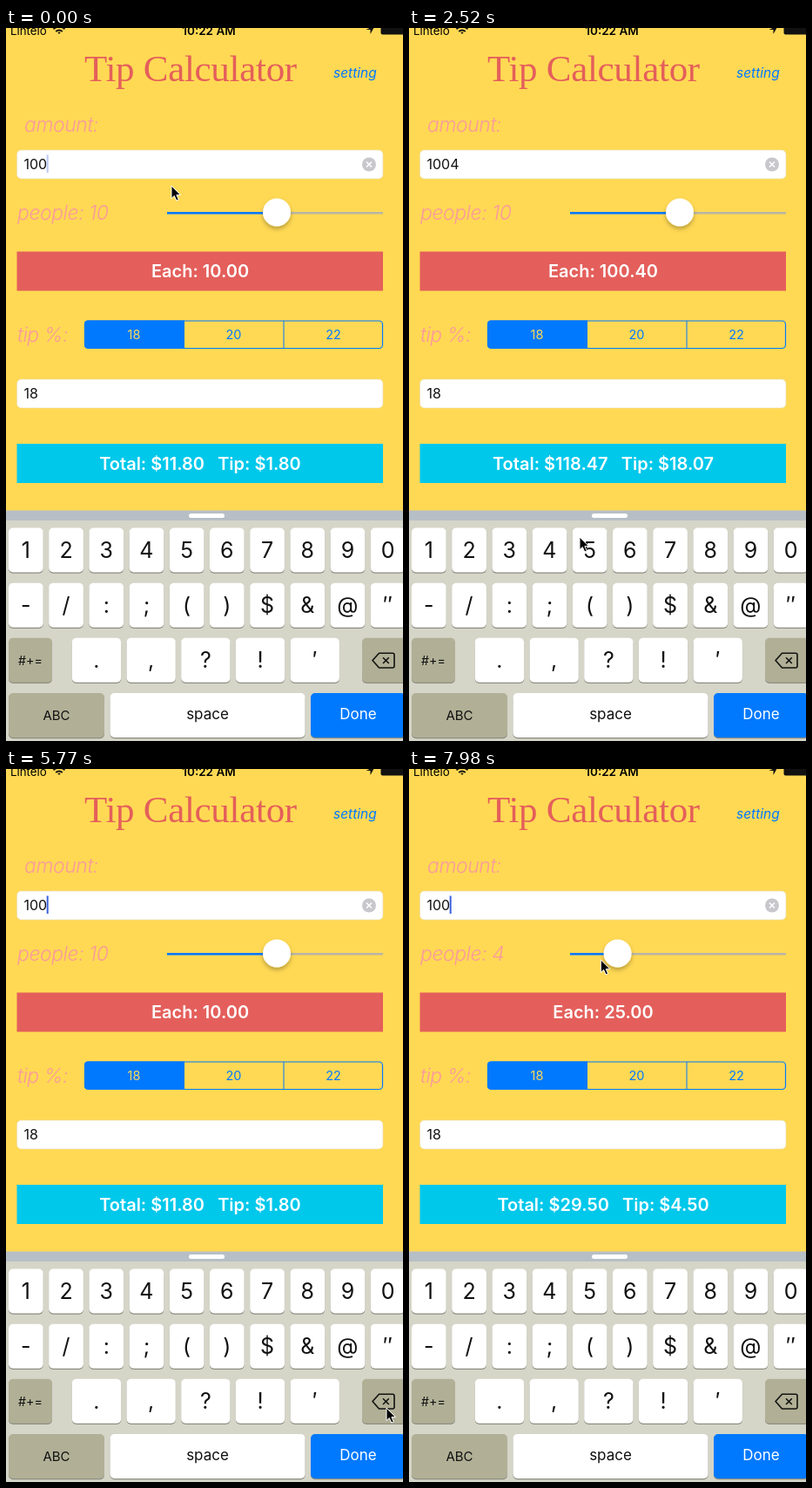
These frames come from a looping animation (456x818 px, 8 s). An HTML page:

```html
<!DOCTYPE html>
<html lang="en">
<head>
<meta charset="utf-8">
<title>Tip Calculator</title>
<style>
  html, body { margin: 0; width: 100%; height: 100%; overflow: hidden; background: #ffd954; }
  svg { display: block; width: 456px; height: 818px; font-family: Inter, Roboto, sans-serif; }
  text { white-space: pre; }
  .mid { text-anchor: middle; }
  .label { font-size: 23px; font-style: italic; font-weight: 300; letter-spacing: -.45px; fill: #fb9a9c; }
  .bar { font-size: 20px; font-weight: 600; fill: #fff; text-anchor: middle; }
  .field { font-size: 16px; fill: #111; }
  .seg { font-size: 14.5px; fill: #0079ff; text-anchor: middle; }
</style>
</head>
<body>
<svg id="stage" viewBox="0 0 456 818">
  <defs>
    <filter id="soft" x="-50%" y="-50%" width="200%" height="200%">
      <feDropShadow dx="0" dy="3" stdDeviation="2.6" flood-color="#000" flood-opacity=".28"/>
    </filter>
  </defs>
  <rect width="456" height="818" fill="#ffd954"/>

  <text x="5" y="7.5" font-size="13.3">Lintelo</text>
  <g fill="none" stroke="#111" stroke-width="1.8">
    <path d="M54.5 1.2Q61 -4 67.5 1.2M57.2 4Q61 1 64.8 4"/>
    <path d="M59.2 4.8L61 7L62.8 4.8Z" fill="#111" stroke="none"/>
  </g>
  <text class="mid" x="233" y="7.5" font-size="13.5" font-weight="600">10:22 AM</text>
  <path d="M424 -3L413.5 2H418.5V7Z" fill="#111"/>
  <rect x="430.5" y="-4" width="30" height="11.5" rx="2" fill="#111"/>

  <text x="90" y="61" font-size="43" letter-spacing="-.3" fill="#e45f5b"
    style="font-family:'Liberation Serif',serif">Tip Calculator</text>
  <text x="376" y="56.5" font-size="15.5" font-style="italic" fill="#0079ff">setting</text>

  <text class="label" x="21" y="119">amount:</text>
  <rect x="12.5" y="140" width="420.5" height="33" rx="5" fill="#fff" stroke="#e6d9a8" stroke-width=".6"/>
  <text class="field" id="amount" x="20.5" y="162"></text>
  <rect id="caret" y="145.5" width="2" height="20.5" fill="#3a62dc"/>
  <circle cx="417" cy="156.5" r="8" fill="#c7c7cc"/>
  <path d="M414 153.5l6 6m0 -6l-6 6" stroke="#fff" stroke-width="1.6"/>

  <text class="label" id="people" x="13" y="220"></text>
  <path d="M185 212.3H433" stroke="#b8b5a6" stroke-width="2.4"/>
  <path id="track" stroke="#0079ff" stroke-width="2.6"/>
  <circle id="thumb" cy="211.5" r="16" fill="#fff" filter="url(#soft)"/>

  <rect x="12.5" y="256.5" width="420.5" height="45" fill="#e45f5b"/>
  <text class="bar" id="each" x="223" y="286"></text>

  <text class="label" x="13" y="360">tip %:</text>
  <path d="M205 335.5H94a4 4 0 0 0 -4 4V363.500a4 4 0 0 0 4 4H205Z" fill="#0079ff"/>
  <rect x="90.500" y="336" width="342" height="31.500" rx="4" fill="none" stroke="#0079ff" stroke-width="1.2"/>
  <path d="M319 336V367" stroke="#0079ff"/>
  <text class="seg" x="147" y="356.5" style="fill:#ffd954">18</text>
  <text class="seg" x="261.5" y="356.5">20</text>
  <text class="seg" x="376" y="356.5">22</text>

  <rect x="12.5" y="403" width="420.5" height="33" rx="5" fill="#fff" stroke="#e6d9a8" stroke-width=".6"/>
  <text class="field" x="20.5" y="425">18</text>

  <rect x="12.5" y="477" width="420.5" height="45" fill="#00c8eb"/>
  <text class="bar" id="total" x="223" y="506.5"></text>

  <rect y="553.5" width="456" height="12" fill="#b7bfc6"/>
  <rect x="210" y="557" width="41" height="5" rx="2.5" fill="#fff"/>
  <rect y="565" width="456" height="253" fill="#d5d5c8"/>
  <g id="keys"></g>
  <path id="erase" d="M421 725.5L428.500 717.200H444Q446 717.200 446 719.200V732Q446 734 444 734H428.500Z"
    stroke="#111" stroke-width="1.6" stroke-linejoin="round"/>
  <path id="cross" d="M433 722.200l6.800 6.800m0 -6.800l-6.800 6.800" stroke-width="1.6"/>

  <path id="mouse" d="M0 0V14.500L3.300 11.500L5.800 17L8.300 15.900L5.900 10.600L10.400 10.400Z"
    fill="#000" stroke="#fff" stroke-width="1"/>
</svg>
<script>
const LOOP = 8000, BEAT = 147.8;
const WHITE = '#fff', DARK = '#b1b096', BLUE = '#0079ff';
const $ = id => document.getElementById(id);

function add(tag, attrs, text = '') {
  const el = document.createElementNS('http://www.w3.org/2000/svg', tag);
  for (const name in attrs) el.setAttribute(name, attrs[name]);
  el.textContent = text;
  $('keys').append(el);
  return el;
}

function key(x, y, width, label, size, base, fill = WHITE, ink = '#111') {
  const box = { x, width, height: 51, rx: 5 };
  add('rect', { ...box, y: y + 1.2, fill: '#8d8d82' });
  const face = add('rect', { ...box, y, fill });
  add('text', { x: x + width / 2, y: y + base, 'font-size': size, fill: ink, class: 'mid' }, label);
  return face;
}

const digits = [...'1234567890'].map((c, i) => key(3 + 46.2 * i, 573.5, 39.7, c, 25, 34.5));
[...'-/:;()$&@″'].forEach((c, i) => key(3 + 46.2 * i, 636.8, 39.7, c, 25, 34));
[...'.,?!′'].forEach((c, i) => key(75.8 + 62.7 * i, 699.8, 56.3, c, 25, 34));
key(3, 699.8, 50, '#+=', 14.2, 31, DARK);
const eraseKey = key(409, 699.8, 52, '', 14, 31, DARK);
key(3, 763, 110, 'ABC', 15, 30.5, DARK);
key(119.5, 763, 224, 'space', 17, 29.5);
key(350, 763, 109, 'Done', 17, 29.5, BLUE, WHITE);

// [beat, amount, beat at which the caret blink restarts]
const edits = [[0, 100, -3.86], [12, 1004, 12], [22, 10045, 22], [34, 1004, 34], [38, 100, 39]];
// [beat, x, y]
const path = [
  [0, 190, 181], [8, 168, 549], [11, 164, 587], [14, 164, 587], [17, 196, 584],
  [22, 199, 593], [28, 199, 593], [30, 389, 594], [31, 389, 594], [33, 440, 735],
  [36, 439, 738], [39, 437, 733], [45, 306, 218], [47, 306, 218], [54, 206, 219]
];

function mouseAt(beat) {
  const i = Math.max(1, path.findIndex(p => p[0] >= beat));
  const [b0, x0, y0] = path[i - 1], [b1, x1, y1] = path[i];
  const k = (beat - b0) / (b1 - b0);
  return [x0 + (x1 - x0) * k, y0 + (y1 - y0) * k];
}

function caretAlpha(age) {
  if (age < 440) return 1;
  const q = (age - 440) % 900;
  if (q < 200) return 1 - q / 200;
  return Math.min(1, Math.max(0, (q - 430) / 170));
}

function draw(beat) {
  const [, amount, reset] = edits.filter(e => e[0] <= beat).pop();
  const [mx, my] = mouseAt(beat);
  // The thumb trails the pointer by one beat.
  const thumb = beat > 47 ? mouseAt(beat - 1)[0] + 5 : 311;
  const people = Math.floor(1 + (thumb - 200) / 217 * 19);
  const each = amount / people, tip = each * .18;

  $('amount').textContent = amount;
  $('people').textContent = `people: ${people}`;
  $('each').textContent = `Each: ${each.toFixed(2)}`;
  $('total').textContent = `Total: $${(each + tip).toFixed(2)}   Tip: $${tip.toFixed(2)}`;

  $('caret').setAttribute('x', 17.6 + 9.7 * String(amount).length);
  $('caret').setAttribute('opacity', caretAlpha((beat - reset) * BEAT));
  $('thumb').setAttribute('cx', thumb);
  $('track').setAttribute('d', `M185 212.3H${thumb}`);
  $('mouse').setAttribute('transform', `translate(${mx} ${my})`);

  digits[3].setAttribute('fill', beat === 12 ? DARK : WHITE);
  digits[4].setAttribute('fill', beat === 22 ? DARK : WHITE);
  const erasing = beat === 34 || beat === 38;
  eraseKey.setAttribute('fill', erasing ? WHITE : DARK);
  $('erase').setAttribute('fill', erasing ? '#111' : 'none');
  $('cross').setAttribute('stroke', erasing ? WHITE : '#111');
}

const start = performance.now();
let shown = -1;
function tick() {
  const beat = Math.floor((performance.now() - start) % LOOP / BEAT);
  if (beat !== shown) draw(shown = beat);
  requestAnimationFrame(tick);
}
tick();
</script>
</body>
</html>
```
